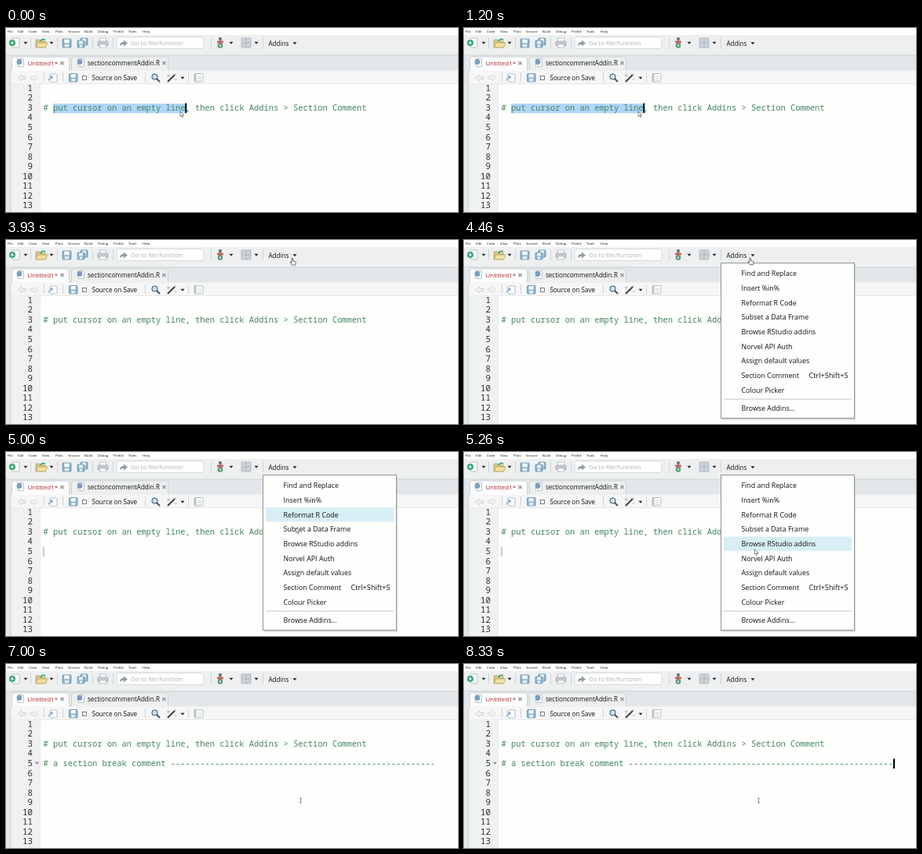
Animation of 576 by 236 pixels, one loop 8.4 s. Source, as an HTML page:

```html
<!DOCTYPE html>
<html lang="en">
<head>
<meta charset="utf-8">
<title>Section comment addin</title>
<style>
html, body { margin: 0; width: 100%; height: 100%; overflow: hidden; background: #fefefc; }
svg { display: block; width: 576px; height: 236px; }
text { font-family: "Open Sans", "Noto Sans", sans-serif; white-space: pre; }
.code, .num { font-family: "Noto Sans Mono", "DejaVu Sans Mono", monospace; }
.code { font-size: 10.42px; fill: #43865f; }
.num { font-size: 10.8px; fill: #2c2e30; text-anchor: end; }
</style>
</head>
<body>
<svg id="stage" viewBox="0 0 576 236" xmlns="http://www.w3.org/2000/svg"></svg>
<script>
const LOOP = 8400;
const CHAR = 6.25, CODE_X = 47.5, LINE = 12.53;
const ROW_TOP = 33.7, ROW = 18.72;

const PAPER = '#fefefc', BAR = '#eef0f0', STRIP = '#e3e7e9', EDGE = '#c6cccf', INK = '#101214';

const rowY = n => 77 + LINE * (n - 1);
const colX = n => CODE_X + CHAR * n;

const rect = (x, y, w, h, fill, more = '') =>
  `<rect x="${x}" y="${y}" width="${w}" height="${h}" fill="${fill}" ${more}/>`;
const path = (d, fill, stroke = 'none', width = 1, more = '') =>
  `<path d="${d}" fill="${fill}" stroke="${stroke}" stroke-width="${width}" ${more}/>`;
const dot = (x, y, r, fill, more = '') => `<circle cx="${x}" cy="${y}" r="${r}" fill="${fill}" ${more}/>`;
const label = (x, y, size, str, fill = INK) =>
  `<text x="${x}" y="${y}" font-size="${size}" fill="${fill}">${str}</text>`;
const code = (n, str) => `<text class="code" x="${CODE_X}" y="${rowY(n) + 3.5}">${str}</text>`;
const down = (x, y, fill = '#26282c') => path(`M${x - 2.5} ${y - 1.2}h5l-2.5 3z`, fill);
const divider = (x, y, h) => rect(x, y, 1, h, '#d0d4d6');

const disk = (x, y, s = 11) =>
  rect(x, y, s, s, '#8db3cc', 'rx="1" stroke="#6490b0" stroke-width=".8"') +
  rect(x + 2.2, y + .6, s - 4.4, s * .42, '#f6fafb') +
  rect(x + 2.8, y + s * .62, s - 5.6, s * .34, '#e2edf2');

const page = (x, y, w, h) =>
  rect(x, y, w, h, '#fcfdfd', 'rx=".8" stroke="#a9b4ba" stroke-width=".8"');

const tabIcon = x => page(x + 1.5, 39.5, 8, 10) + dot(x + 4, 43.5, 3.4, '#7f9dbe');

const cross = (x, y) => path(`M${x - 2} ${y - 2}l4 4m0 -4l-4 4`, 'none', '#8b9094', 1.3);

function menuBar() {
  const items = [['File', 2], ['Edit', 15], ['Code', 29], ['View', 46], ['Plots', 63], ['Session', 79],
    ['Build', 100], ['Debug', 117], ['Profile', 137], ['Tools', 156], ['Help', 174]];
  return rect(0, 0, 576, 9, PAPER) + items.map(([s, x]) => label(x, 6, 4.3, s)).join('');
}

function toolbar() {
  return rect(0, 9, 576, 27, BAR) +
    // new file
    page(8, 13, 9, 12) + dot(8, 19, 4, '#2fa56c') +
    path('M5.8 19h4.4M8 16.8v4.4', 'none', '#fff', 1.2) + down(25, 19) + divider(31, 12, 14) +
    // open
    path('M38 15h5l1.5 2h6v8h-12.5z', '#dcc67c', '#aa9a6a', .7) +
    path('M40 19h13l-2.5 6h-12z', '#f0e09c', '#aa9a6a', .7) +
    path('M44 17q2-4 6-2', 'none', '#2fa56c', 1.8) + down(58, 19) + divider(65, 12, 14) +
    // save, save all, print
    disk(72, 14) + disk(95, 13, 9) + disk(91, 16, 9) + divider(110, 12, 14) +
    rect(119.5, 13, 8, 5, '#fcfdfd', 'stroke="#a9b4ba" stroke-width=".7"') +
    rect(117, 17, 13, 6, '#c3ccd2', 'rx="1" stroke="#9aa6ae" stroke-width=".7"') +
    rect(119.5, 21, 8, 4, '#fcfdfd', 'stroke="#a9b4ba" stroke-width=".7"') + divider(136, 12, 14) +
    // search field
    rect(141, 11.5, 111, 15, PAPER, 'rx="3" stroke="#ccd2d5" stroke-width=".8"') +
    path('M145 23q0-5 5-5v-2.5l5 4-5 4v-2.5q-3 0-5 2z', '#8c9eac') +
    label(159, 22, 7.9, 'Go to file/function', '#acb0b3') + divider(261, 12, 14) +
    // version control
    rect(272, 12, 2, 13, '#7b8084') + dot(273, 14, 2.1, '#6b7074') +
    rect(269, 16.5, 8, 3, '#c8605a', 'rx="1"') + dot(273, 22.5, 3.2, '#55966c') +
    dot(273, 22.5, 1.2, BAR) + down(287, 19) +
    // panes
    rect(300, 13, 12, 12, '#ccd4d9', 'rx="1" stroke="#a3aeb5" stroke-width=".8"') +
    path('M306 13v12M300 19h12', 'none', '#a3aeb5', .8) + down(319, 19) + divider(327, 12, 14) +
    label(334.5, 22.9, 8.1, 'Addins') + down(368, 19.5);
}

function tabs() {
  return rect(0, 35, 576, 20, STRIP) + rect(0, 34.5, 576, .8, EDGE) +
    path('M83.5 54v-14q0-3 3-3h117q3 0 3 3v14', BAR, EDGE, .8) +
    path('M7.5 55v-15q0-3 3-3h67q3 0 3 3v15', '#fbfcfb', EDGE, .8) +
    tabIcon(13) + label(27.5, 48.2, 7.95, 'Untitled1*', '#b3242e') + cross(71.5, 45) +
    tabIcon(90) + label(104, 48.2, 8.06, 'sectioncommentAddin.R') + cross(201.5, 45);
}

function editorBar() {
  return rect(6, 54.5, 570, 17, '#f5f6f5') + rect(6, 71, 570, .8, '#d8dcdc') +
    path('M15 64l5-4v2.5h5v3h-5v2.5z', '#f1f4f5', '#bcc5ca', .7) +
    path('M41 64l-5-4v2.5h-5v3h5v2.5z', '#f1f4f5', '#ccd3d7', .7) + divider(48, 57, 12) +
    page(56, 59, 9, 10) + path('M54 67l5-5m-3 0h3v3', 'none', '#7f9dbe', 1.1) + divider(72, 57, 12) +
    disk(80.5, 58.5, 10.5) +
    rect(97.5, 61.5, 5, 5, '#fff', 'stroke="#55595c" stroke-width=".8"') +
    label(109.5, 67.2, 8.15, 'Source on Save') + divider(177, 57, 12) +
    dot(189.5, 62.5, 3.4, '#cfe2ee', 'stroke="#4f7590" stroke-width="1.3"') +
    path('M192 65l4 4', 'none', '#4a4e54', 1.9) +
    path('M206 69l9-9', 'none', '#3c4044', 2) +
    path('M207 59v4M205 61h4M216 58v3M214.5 66h3', 'none', '#a0b2bd', .9) +
    down(225, 64) + divider(232, 57, 12) +
    page(240, 58.5, 11, 10.5) + rect(240, 58.5, 2.5, 10.5, '#b7c3ca') +
    path('M244 62h5M244 64.5h5M244 67h5', 'none', '#b7c3ca', .7);
}

function editor() {
  let out = rect(0, 35, 6, 201, STRIP) + rect(6, 71.8, 570, 165, PAPER) +
    rect(6, 71.8, 37.5, 165, '#f0f1f1') + rect(5.4, 54, .8, 182, EDGE) +
    rect(43.2, 71.8, .6, 165, '#e0e3e3');
  for (let n = 1; n <= 13; n++) out += `<text class="num" x="34" y="${rowY(n) + 3.9}">${n}</text>`;
  return out +
    rect(colX(2), 97, CHAR * 27, 12.3, '#b0d6fa', 'id="selection"') +
    code(3, '# put cursor on an empty line, then click Addins &gt; Section Comment') +
    `<g id="section">${code(5, '# a section break comment ' + '-'.repeat(54))}${down(39.5, 127, '#7a8c9a')}</g>` +
    rect(0, 0, 2, 12.6, '#000', 'id="caret"');
}

function addinsMenu() {
  const items = ['Find and Replace', 'Insert %in%', 'Reformat R Code', 'Subset a Data Frame',
    'Browse RStudio addins', 'Norvel API Auth', 'Assign default values', 'Section Comment', 'Colour Picker'];
  return '<g id="menu">' +
    rect(329, 31, 170, 200, '#c4c8ca', 'opacity=".6"') +
    rect(327.5, 29.5, 170, 199, PAPER, 'stroke="#8e9599" stroke-width="1"') +
    rect(331, 0, 163, ROW - .5, '#d8eef5', 'id="highlight"') +
    items.map((s, i) => label(353.5, ROW_TOP + ROW * (i + .5) + 3.1, 8.9, s)).join('') +
    label(439.5, ROW_TOP + ROW * 7.5 + 3.1, 9.2, 'Ctrl+Shift+S') +
    rect(331, 203.6, 163, .9, '#bcc0c2') +
    label(353.5, 219.4, 8.9, 'Browse Addins...') + '</g>';
}

function pointers() {
  return '<g id="pointer">' +
    path('M0 0v6.6l1.5-1.3 1.1 2.4 1.1-.5-1.1-2.3h2.1z', '#fff', '#54585c', .7, 'data-kind="arrow"') +
    path('M-1.6-3h1.2l.4.4.4-.4h1.2M0-2.6v5.2M-1.6 3h1.2l.4-.4.4.4h1.2', 'none', '#55595c', .7, 'data-kind="beam"') +
    path('M-.8.8q.8-1.2 1.6 0v3l3 .8q.8.3.6 1.2l-.6 3.4h-4l-2.4-3.4q-.2-1 .8-.8l1 .8z',
      '#fff', '#3f4346', .8, 'data-kind="hand"') + '</g>';
}

const stage = document.getElementById('stage');
stage.innerHTML = menuBar() + toolbar() + tabs() + editorBar() + editor() + addinsMenu() + pointers();
const el = Object.fromEntries(['selection', 'section', 'caret', 'menu', 'highlight', 'pointer']
  .map(id => [id, document.getElementById(id)]));

const CLICK = 2400, OPEN = 4130, CLOSE = 5860, INSERT = 6300;

// time, x, y
const route = [[0, 222, 107], [1600, 222, 107], [2250, 57, 132], [2900, 57, 132], [3300, 428, 14],
  [3750, 365, 23], [4600, 364.5, 22.5], [5000, 369.5, 97], [5700, 371.8, 171], [5950, 371.8, 171],
  [6250, 375.5, 175], [LOOP, 375.5, 175]];
const kinds = [[0, 'arrow'], [1700, 'beam'], [3000, 'arrow'], [3700, 'hand'], [4600, 'arrow'], [5950, 'beam']];
// time, column, row, opacity
const carets = [[0, 29, 3, 1], [530, 29, 3, 0], [1030, 29, 3, 1], [1530, 29, 3, 0], [2030, 29, 3, 1],
  [CLICK, 0, 5, 1], [2930, 0, 5, 0], [3400, 0, 5, 1], [3900, 0, 5, 0], [4700, 0, 5, .2],
  [INSERT, 80, 5, 1], [6800, 80, 5, 0], [7300, 80, 5, 1], [7800, 80, 5, 0], [8300, 80, 5, 1]];

const latest = (table, t) => table.filter(step => step[0] <= t).pop();

function mouseAt(t) {
  const i = Math.max(1, route.findIndex(p => p[0] > t));
  const [t0, x0, y0] = route[i - 1], [t1, x1, y1] = route[i];
  const k = (t - t0) / (t1 - t0);
  return [x0 + (x1 - x0) * k, y0 + (y1 - y0) * k];
}

const show = (node, on) => node.setAttribute('visibility', on ? 'visible' : 'hidden');

function draw(t) {
  const [x, y] = mouseAt(t);
  const kind = latest(kinds, t)[1];
  el.pointer.setAttribute('transform', `translate(${x} ${y})`);
  for (const shape of el.pointer.children) show(shape, shape.dataset.kind === kind);

  const [, col, row, alpha] = latest(carets, t);
  el.caret.setAttribute('x', colX(col) - .5);
  el.caret.setAttribute('y', rowY(row) - 5.6);
  el.caret.setAttribute('opacity', alpha);

  show(el.selection, t < CLICK);
  show(el.section, t >= INSERT);

  const open = t >= OPEN && t < CLOSE;
  el.menu.setAttribute('display', open ? 'inline' : 'none');
  if (open) {
    // the highlight trails the pointer slightly
    const item = Math.floor((mouseAt(t - 70)[1] - ROW_TOP) / ROW);
    el.highlight.setAttribute('opacity', item >= 0 ? 1 : 0);
    el.highlight.setAttribute('y', ROW_TOP + ROW * Math.max(0, item));
  }
}

const start = performance.now();
function tick() {
  draw((performance.now() - start) % LOOP);
  requestAnimationFrame(tick);
}
tick();
</script>
</body>
</html>
```
